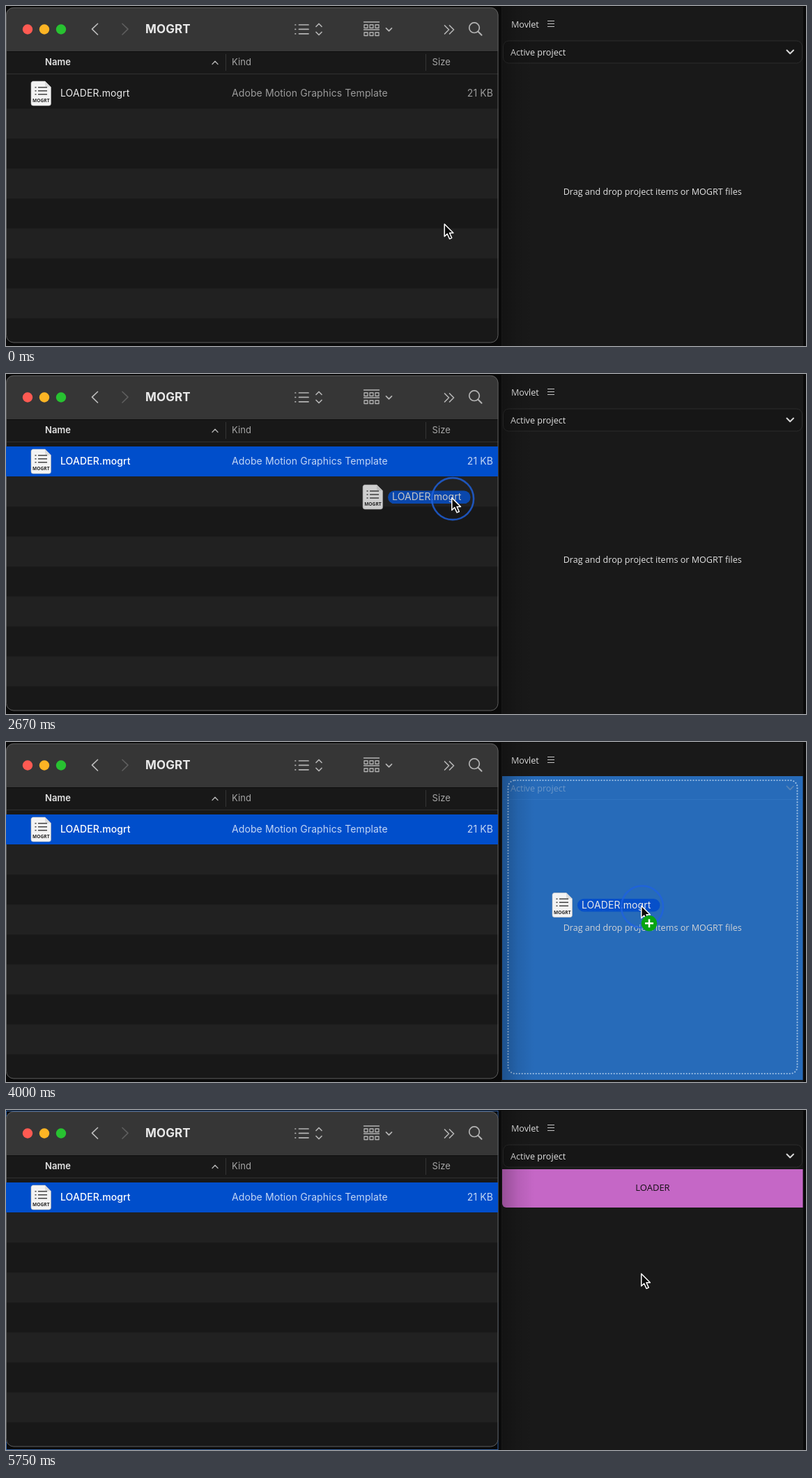
An HTML page for the animation above (5830 ms loop, 1148 px wide and 488 px high).

```html
<!DOCTYPE html>
<html lang="en">
<head>
<meta charset="utf-8">
<title>Drag a template into the panel</title>
<style>
  html, body { margin: 0; width: 100%; height: 100%; overflow: hidden; background: #0a0a0a; }
  svg { display: block; width: 1148px; height: 488px; }
  text { font: 14px Inter, "Liberation Sans", sans-serif; letter-spacing: .1px; fill: #e9e9e9; white-space: pre; }
  .head { font-size: 13px; fill: #a5a5a5; }
  .panel text { font: 12.6px "Open Sans", "Noto Sans", sans-serif; letter-spacing: 0; fill: #e2e2e2; }
  .line { fill: none; stroke: #b4b4b4; stroke-width: 1.7; stroke-linecap: round; stroke-linejoin: round; }
</style>
</head>
<body>
<svg viewBox="0 0 1148 488">
  <defs>
    <linearGradient id="shade">
      <stop offset="0" stop-color="#000" stop-opacity=".24"/>
      <stop offset=".5" stop-color="#000" stop-opacity=".08"/>
      <stop offset="1" stop-color="#000" stop-opacity="0"/>
    </linearGradient>
    <clipPath id="frame"><rect x="0" y="2" width="706.5" height="481.5" rx="11"/></clipPath>
    <g id="doc">
      <path d="M39.500 108H56L64.500 116.500V140a3 3 0 0 1-3 3H39a3 3 0 0 1-3-3V111a3 3 0 0 1 3.500-3Z" fill="#f3f3f3" stroke="#bcbcbc" stroke-width=".6"/>
      <path d="M56 108V114a2.500 2.500 0 0 0 2.500 2.500H64.500Z" fill="#dcdcdc"/>
      <path d="M41.500 116.800h2M41.500 121.800h2M41.500 126.800h2M46 116.800h13M46 121.800h13M46 126.800h13" stroke="#444" stroke-width="1.500"/>
      <text x="50.300" y="138" text-anchor="middle" style="font:700 6.600px 'Open Sans',sans-serif;letter-spacing:0;fill:#222">MOGRT</text>
    </g>
  </defs>

  <rect width="1148" height="488" fill="#0a0a0a"/>
  <rect id="focus" x=".5" y="1.500" width="705.500" height="486" fill="none" stroke="#315f9f"/>

  <g clip-path="url(#frame)">
    <rect width="707" height="488" fill="#181818"/>
    <rect width="707" height="65" fill="#363636"/>
    <path d="M0 65.500H707" stroke="#0d0d0d"/>
    <path d="M0 97.500H707" stroke="#303030"/>
    <g id="stripes" fill="#212121"></g>
  </g>
  <rect x=".5" y="2.500" width="705.500" height="480.500" rx="10.500" fill="none" stroke="#5c5c5c"/>
  <rect id="selection" y="104" width="706" height="43" fill="#004ecb"/>

  <circle cx="31" cy="33.500" r="7.200" fill="#ff5a52"/>
  <circle cx="55" cy="33.500" r="7.200" fill="#fcb424"/>
  <circle cx="79" cy="33.500" r="7.200" fill="#28c231"/>
  <g class="line">
    <path d="M131.500 25.500L123.500 33.200L131.500 41" stroke="#bcbcbc"/>
    <path d="M167 25.500L175 33.200L167 41" stroke="#5e5e5e"/>
    <path d="M415 27h.6M415 33.400h.6M415 39.800h.6M420.500 27H434M420.500 33.400H434M420.500 39.800H434"/>
    <path d="M445 29.500L449 25.500L453 29.500M445 37.500L449 41.500L453 37.500"/>
    <path d="M513.500 23H535.500M513.500 34H535.500" stroke-width="1.400"/>
    <path id="cells" stroke-width="1.300"/>
    <path d="M545.500 31.800L549.500 35.800L553.500 31.800"/>
    <path d="M629.500 28L635.500 34L629.500 40M636.500 28L642.500 34L636.500 40"/>
    <circle cx="672" cy="31.200" r="7.300"/>
    <path d="M677.500 36.800L682.500 41.800" stroke-width="2"/>
    <path d="M296 83.500L300 79.200L304 83.500" stroke-width="1.300"/>
  </g>
  <path d="M315.500 69V93M602.500 69V93" stroke="#353535"/>
  <text x="200" y="39.300" style="font-size:17px;font-weight:700">MOGRT</text>
  <text x="56" y="85" class="head" style="font-weight:600;fill:#e4e4e4">Name</text>
  <text x="324" y="85" class="head">Kind</text>
  <text x="611.500" y="85" class="head">Size</text>
  <use href="#doc"/>
  <text id="name" x="78" y="130.300">LOADER.mogrt</text>
  <g id="details">
    <text x="324" y="130.300" style="fill:inherit">Adobe Motion Graphics Template</text>
    <text x="699" y="130.300" text-anchor="end" style="fill:inherit">21 KB</text>
  </g>

  <g class="panel">
    <rect x="711" y="1" width="433" height="487" fill="#191919"/>
    <text x="725" y="30.500">Movlet</text>
    <path d="M777 21.500H787M777 25.500H787M777 29.500H787" stroke="#c4c4c4"/>
    <rect x="713.500" y="50" width="429" height="32" rx="8" fill="#161616" stroke="#2d2d2d"/>
    <text x="724" y="71">Active project</text>
    <path d="M1120.500 63.500L1125.200 68.300L1130 63.500" class="line" style="stroke:#d8d8d8;stroke-width:2"/>
    <g id="dropzone">
      <rect x="712" y="49" width="431.500" height="436" fill="#276bb9"/>
      <g opacity=".36">
        <text x="724" y="71">Active project</text>
        <path d="M1120.500 63.500L1125.200 68.300L1130 63.500" class="line"/>
      </g>
      <path d="M714 82.500H1142" stroke="#2f73c0"/>
      <rect x="720.500" y="55" width="415" height="421" rx="10" fill="none" stroke="#9fc1e6" stroke-width="2.200" stroke-linecap="round" stroke-dasharray="0 4"/>
    </g>
    <text id="hint" x="927.700" y="271" text-anchor="middle">Drag and drop project items or MOGRT files</text>
    <g id="clip">
      <path d="M712 85H1143.500V140H718a6 6 0 0 1-6-6Z" fill="#c567c6"/>
      <text x="928" y="116" text-anchor="middle" style="font-size:13px;font-weight:500;fill:#151015">LOADER</text>
    </g>
    <rect x="712" y="1" width="46" height="487" fill="url(#shade)"/>
  </g>

  <g id="ghost">
    <use href="#doc"/>
    <rect x="72" y="116.500" width="118.500" height="18.500" rx="9.200" fill="#0650ca"/>
    <text x="78" y="130.300">LOADER.mogrt</text>
  </g>
  <circle id="ring" fill="none" stroke="#1f62e0" stroke-width="2.600"/>
  <g id="pointer">
    <path d="M.7 1V18.800L4.700 15L8 22.300L11.200 20.900L8 13.800H13.400Z" fill="#0b0b0b" stroke="#fff" stroke-width="1.500" stroke-linejoin="round"/>
    <g id="badge">
      <circle cx="12" cy="26.300" r="11.200" fill="#08a512"/>
      <path d="M6 26.300H18M12 20.300V32.300" stroke="#fff" stroke-width="2.500"/>
    </g>
  </g>
</svg>
<script>
  // The picture advances 70 times per loop; SLACK absorbs rounding to 10 ms.
  const LOOP = 5830, STEP = LOOP / 70, SLACK = 4;
  const SELECT = 1490, DROP = 4090, IMPORTED = 4480;
  const START = [628.5, 312];
  const MOVES = [
    { from: 500, to: 1000, x: 203.5, y: 133, bow: 0 },
    { from: 1085, to: 1420, x: 163, y: 125.5, bow: 0 },
    { from: 2333, to: 2912, x: 911, y: 232, bow: 18 },
    { from: 3200, to: 3500, x: 911, y: 234, bow: 0 }
  ];
  const PRESSES = [[SELECT, 1590], [2170, DROP]];

  const el = id => document.getElementById(id);
  const clamp = v => Math.max(0, Math.min(1, v));
  const progress = (t, a, b) => clamp((t - a) / (b - a));
  const ease = p => p < .5 ? 2 * p * p : 1 - 2 * (1 - p) ** 2;
  const show = (id, on) => { el(id).style.display = on ? "" : "none"; };

  for (let y = 147.3; y < 440; y += 86) {
    el("stripes").insertAdjacentHTML("beforeend", `<rect y="${y}" width="707" height="43"/>`);
  }
  el("cells").setAttribute("d", [27, 38].flatMap(y =>
    [514, 522, 530].map(x => `M${x} ${y}h5v4.500h-5z`)).join(""));

  function pointerAt(t) {
    let [x, y] = START;
    for (const m of MOVES) {
      const s = ease(progress(t, m.from, m.to));
      x += (m.x - x) * s;
      y += (m.y - y) * s - m.bow * 4 * s * (1 - s);
    }
    return [x, y];
  }

  function drawRing(t, x, y) {
    const press = PRESSES.find(([down, up]) => t >= down && t < up + 350);
    show("ring", press);
    if (!press) return;
    const fade = progress(t, press[1], press[1] + 350);
    const ring = el("ring");
    ring.setAttribute("cx", x + 2);
    ring.setAttribute("cy", y + 2.5);
    ring.setAttribute("r", 30 + 13 * fade);
    ring.setAttribute("opacity", .8 * (1 - fade) * (.4 + .6 * progress(t, press[0], press[0] + 150)));
  }

  function render(t) {
    const [x, y] = pointerAt(t);
    const dragging = t >= 2400 && t < DROP;
    const over = dragging && x > 712;
    const selected = t >= SELECT;

    show("selection", selected);
    el("name").style.fill = selected ? "#fff" : "#e9e9e9";
    el("name").style.fontWeight = selected ? 500 : 400;
    el("details").style.fill = selected ? "#c3d6f5" : "#9b9b9b";
    show("dropzone", over);
    show("badge", over);
    show("hint", t < IMPORTED);
    el("hint").style.fill = over ? "#d0d2d5" : "#e2e2e2";
    show("clip", t >= IMPORTED);
    show("focus", t >= IMPORTED);

    show("ghost", dragging);
    el("ghost").setAttribute("transform", `translate(${x - 163} ${y - 125.5})`);
    el("ghost").setAttribute("opacity", .75 + .25 * progress(t, 2500, 3050));
    el("pointer").setAttribute("transform", `translate(${x} ${y})`);
    drawRing(t, x, y);
  }

  const origin = performance.now();
  function tick() {
    const t = (performance.now() - origin + SLACK) % LOOP;
    render(Math.floor(t / STEP) * STEP);
    requestAnimationFrame(tick);
  }
  tick();
</script>
</body>
</html>
```
